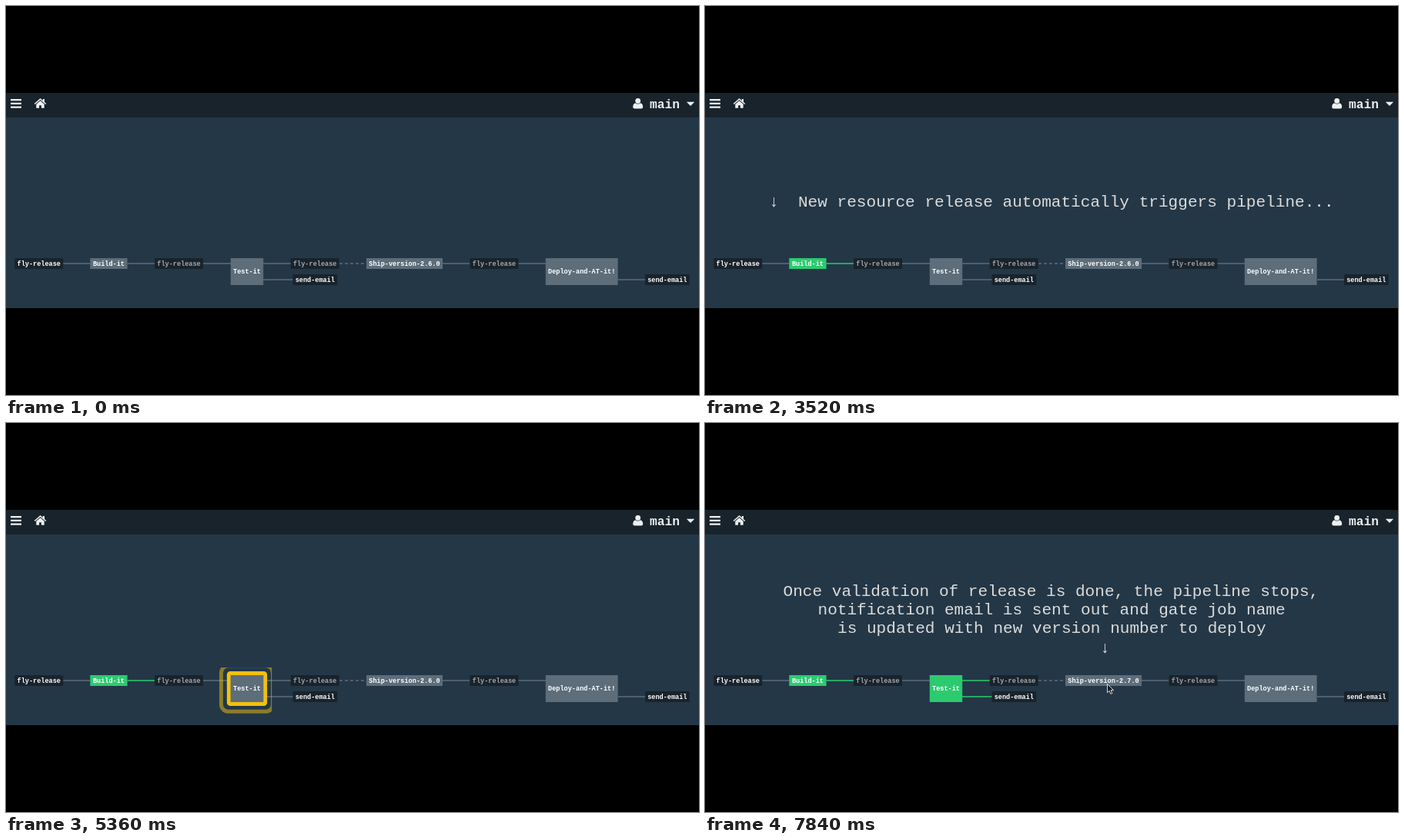
Animation, 900 px wide and 506 px high, one loop 8 s. Source, as an HTML page:

```html
<!DOCTYPE html>
<html lang="en">
<head>
<meta charset="utf-8">
<title>Release pipeline</title>
<style>
  html, body { margin: 0; width: 100%; height: 100%; overflow: hidden; background: #000; }
  svg { display: block; }
  text { font-family: "Courier New", Courier, "Liberation Mono", monospace; white-space: pre; }
  .label { font-size: 8.55px; font-weight: bold; text-anchor: middle; fill: #fff; }
  .caption { font-size: 21.08px; fill: #dcdcda; }
  .edge { stroke: #5d6d7a; stroke-width: 1.5; }
  .job { fill: #5d6d7a; }
  .resource { fill: #19232c; }
  .job.done { fill: #2ccb70; }
  .edge.done { stroke: #2ccb70; }
  .ring { fill: none; stroke: #f1c110; stroke-width: 5; }
</style>
</head>
<body>
<svg width="900" height="506" viewBox="0 0 900 506">
  <defs><clipPath id="panel"><rect y="113" width="900" height="280"/></clipPath></defs>
  <rect width="900" height="506"/>
  <rect y="113" width="900" height="280" fill="#243747"/>
  <rect y="113" width="900" height="32" fill="#18232b"/>
  <g fill="#eef0f1">
    <path d="M6 121h14v2.3H6zM6 125.7h14v2.3H6zM6 130.4h14v2.3H6z"/>
    <path d="M44.5 120l3.3 2.9V121H50v3.9l2.3 2-1 1.1-6.8-5.9-6.8 5.9-1-1.1z"/>
    <path d="M44.5 123.3l5.2 4.5v5h-3.8v-3.6h-2.8v3.6h-3.8v-5z"/>
    <circle cx="820.7" cy="123.4" r="3.4"/>
    <path d="M817.3 126.2q3.4 2.6 6.8 0 3.1.9 3.1 5.2 0 2.1-2.2 2.1h-8.6q-2.2 0-2.2-2.1 0-4.3 3.1-5.2z"/>
    <path d="M883.8 124.8h10.4l-5.2 5.3z"/>
    <text x="836" y="132.5" font-size="16.2" font-weight="bold">main</text>
  </g>
  <g id="edges"></g>
  <g id="rings"></g>
  <g id="nodes"></g>
  <text class="caption" id="trigger" x="83" y="260.5">↓  New resource release automatically triggers pipeline...</text>
  <g class="caption" id="gate">
    <text x="101.5" y="224.5">Once validation of release is done, the pipeline stops,</text>
    <text x="146.5" y="248.5">notification email is sent out and gate job name</text>
    <text x="172" y="272.5">is updated with new version number to deploy</text>
    <text x="513" y="299">↓</text>
  </g>
  <g clip-path="url(#panel)">
    <path id="cursor" d="M0 0v11.2l2.6-2.4 1.8 4.1 2-.9-1.8-3.9h3.5z" fill="#161a1e" stroke="#e8eaec" stroke-width=".9"/>
  </g>
</svg>
<script>
const LOOP = 8000, STEP = 80, PULSE = 960, GROWTH = 0.0103;
const $ = id => document.getElementById(id);
const clamp = v => Math.min(1, Math.max(0, v));
const ramp = (t, start, length) => clamp((t - start) / length);

function add(parent, tag, attrs, text = "") {
  const el = document.createElementNS("http://www.w3.org/2000/svg", tag);
  for (const key in attrs) el.setAttribute(key, attrs[key]);
  el.textContent = text;
  parent.appendChild(el);
  return el;
}

function node(kind, label, x, width, y = 328, height = 14, muted = false) {
  const box = add($("nodes"), "rect", { class: kind, x, y, width, height, rx: kind === "resource" ? 1 : 0 });
  const text = add($("nodes"), "text", {
    class: "label", x: x + width / 2, y: y + height / 2 + 2.5, opacity: muted ? 0.6 : 1
  }, label);
  return { box, text, x, y, width, height };
}

const edge = (x1, x2, y = 335, dash = "none") =>
  add($("edges"), "line", { class: "edge", x1, x2, y1: y, y2: y, "stroke-dasharray": dash });

node("resource", "fly-release", 11.3, 63);
for (const x of [193, 369.7, 602.5]) node("resource", "fly-release", x, 63, 328, 14, true);
node("resource", "send-email", 372.5, 57.7, 349);
node("resource", "send-email", 830, 57.7, 349);
const build = node("job", "Build-it", 109.3, 48.3);
const test = node("job", "Test-it", 291.8, 42.4, 328, 35);
const ship = node("job", "Ship-version-2.6.0", 468, 99);
node("job", "Deploy-and-AT-it!", 700.8, 93.8, 328, 35);

for (const [from, to] of [[74, 109], [256, 292], [567, 602], [665, 701]]) edge(from, to);
edge(433, 468, 335, "4 3");
edge(795, 830, 356);

// Each running job pulses with two rings, half a life apart
function run(job, start, end, outputs) {
  const id = "clip" + start;
  const clip = add(document.querySelector("defs"), "clipPath", { id });
  add(clip, "rect", { x: job.x - 18, y: job.y - 10, width: job.width + 29, height: job.height + 29 });
  const group = add($("rings"), "g", { "clip-path": `url(#${id})` });
  const rings = [0, 1].map(() => add(group, "rect", { class: "ring" }));

  return t => {
    const active = t >= start && t < end;
    group.style.display = active ? "" : "none";
    for (const el of [job.box, ...outputs]) el.classList.toggle("done", t >= end);
    if (!active) return;
    rings.forEach((ring, i) => {
      const age = (t - start) % PULSE + i * PULSE;
      const reach = age * GROWTH, out = reach - 2.5;
      const attrs = {
        x: job.x - out, y: job.y - out,
        width: job.width + 2 * out, height: job.height + 2 * out,
        rx: Math.max(0, out * 0.75), opacity: clamp(2 - age / PULSE)
      };
      for (const key in attrs) ring.setAttribute(key, attrs[key]);
    });
  };
}

const jobs = [
  run(build, 560, 2080, [edge(157.6, 193)]),
  run(test, 3920, 5600, [edge(334, 370), edge(334, 373, 356)])
];

function draw(t) {
  jobs.forEach(update => update(t));
  ship.text.textContent = t < 5600 ? "Ship-version-2.6.0" : "Ship-version-2.7.0";
  $("trigger").style.opacity = ramp(t, 480, 400) - ramp(t, 4720, 400);
  $("gate").style.opacity = ramp(t, 5600, 400);

  const left = (1 - ramp(t, 6480, 1120)) ** 2;
  $("cursor").style.display = t < 6560 ? "none" : "";
  $("cursor").setAttribute("transform", `translate(${522.5 + 60 * left} ${339.5 + 54 * left})`);
}

function tick() {
  const t = performance.now() % LOOP;
  draw(Math.floor(t / STEP) * STEP);
  requestAnimationFrame(tick);
}
tick();
</script>
</body>
</html>
```
